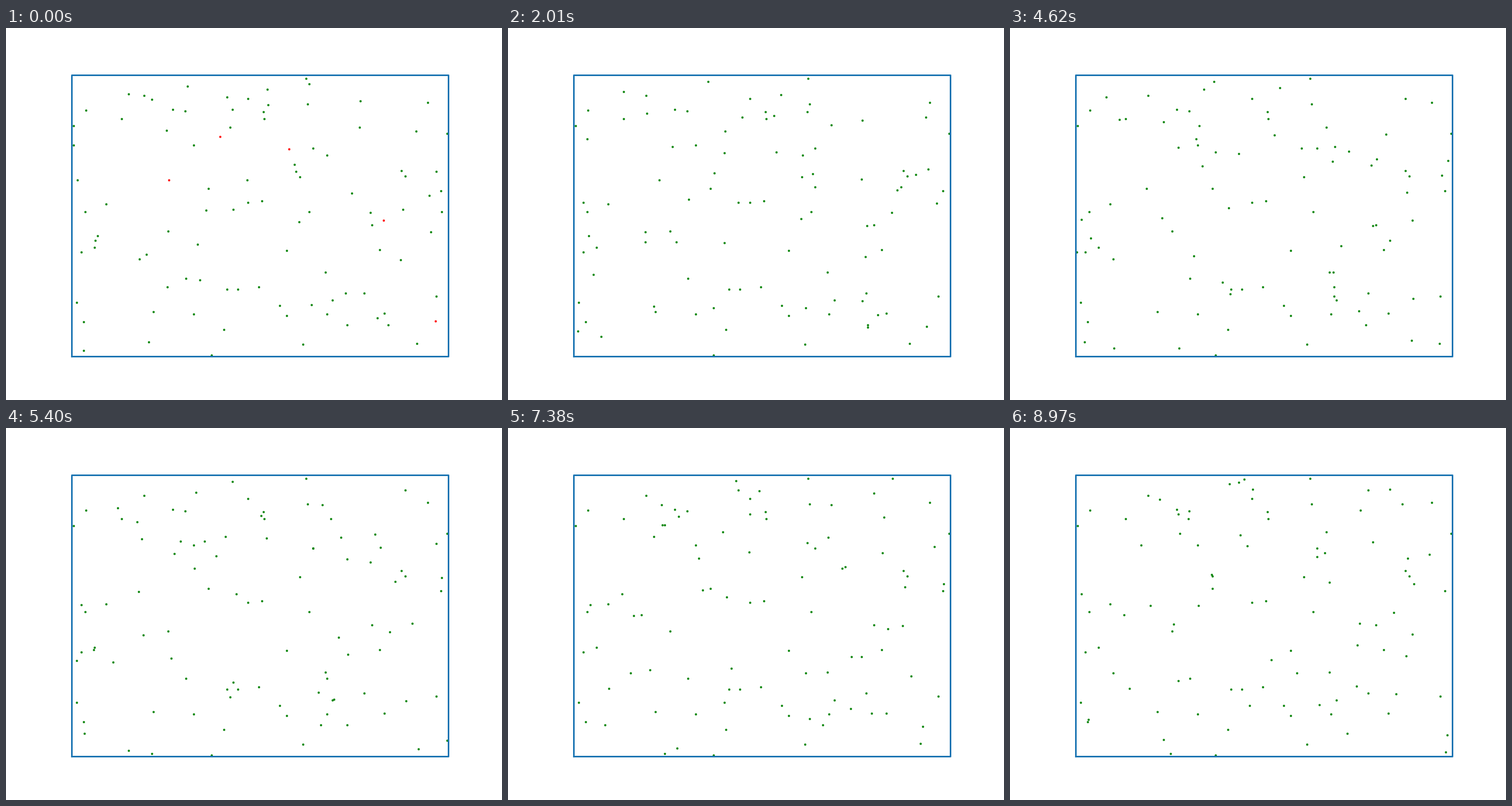
Animation, 640 px wide and 480 px high, one loop 9000 ms. Source, as a matplotlib script:

```python
import numpy as np
import matplotlib.pyplot as plt
from matplotlib.animation import FuncAnimation

FRAMES, INTERVAL = 300, 30
SIZE = 100          # side of the square world
PEOPLE = 100
RESTING = 50        # people who never move
RECOVERY = 14       # frames until the infected turn healthy

rng = np.random.default_rng(7)
infected = np.array([(39.3, 78.3), (57.6, 73.8), (25.7, 62.8),
                     (82.7, 48.5), (96.5, 12.6)])
resting = rng.uniform(0, SIZE, (RESTING, 2))
others = rng.uniform(0, SIZE, (PEOPLE - RESTING - len(infected), 2))


def walk(start):
    """Every walker goes one unit left, right, up or down per frame."""
    moves = np.array([(1, 0), (-1, 0), (0, 1), (0, -1)])
    path = [start]
    for _ in range(FRAMES - 1):
        pos = path[-1]
        step = moves[rng.integers(4, size=len(pos))]
        new = pos + step
        outside = ((new < 0) | (new > SIZE)).any(axis=1)
        path.append(np.where(outside[:, None], pos - step, new))
    return path


path = walk(np.vstack([infected, others]))

fig, ax = plt.subplots(figsize=(6.4, 4.8), dpi=100)
ax.set_xlim(-1, SIZE + 1)
ax.set_ylim(-1, SIZE + 1)
ax.axis("off")

dot = dict(marker="o", ms=1, ls="none")
healthy, = ax.plot([], [], color="green", **dot)
sick, = ax.plot([], [], color="red", **dot)
ax.plot([0, SIZE, SIZE, 0, 0], [0, 0, SIZE, SIZE, 0], color="tab:blue")


def update(i):
    n = len(infected) if i < RECOVERY else 0
    sick.set_data(*path[i][:n].T)
    healthy.set_data(*np.vstack([resting, path[i][n:]]).T)
    return healthy, sick


anim = FuncAnimation(fig, update, frames=FRAMES, interval=INTERVAL,
                     repeat=True, repeat_delay=0)
plt.show()
```
